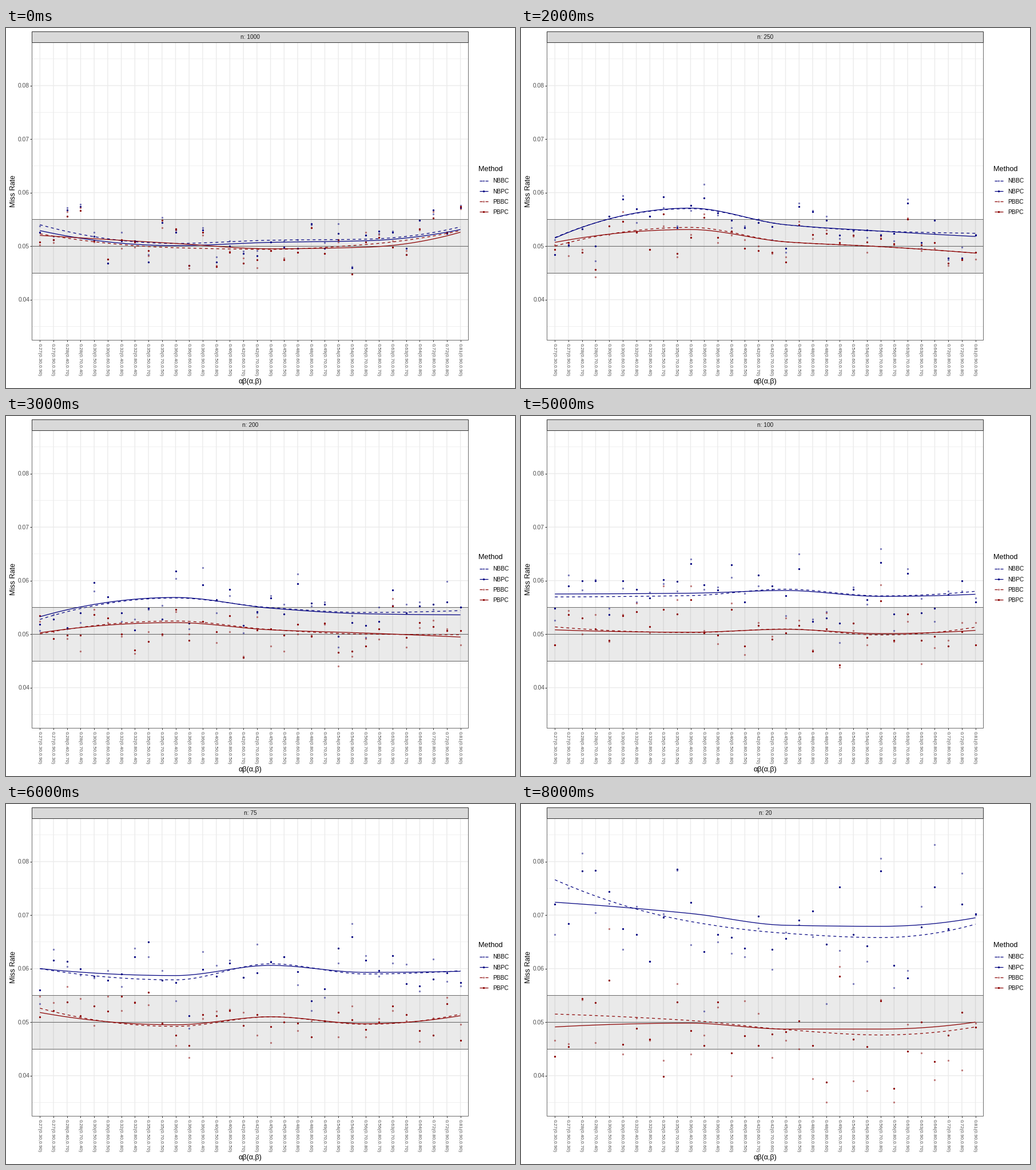
Animation, 890 px wide and 629 px high, one loop 9 s. Source, as a matplotlib script:

```python
import numpy as np
import matplotlib.pyplot as plt
from matplotlib.animation import FuncAnimation
from matplotlib.patches import Rectangle

W, H, DPI = 890, 629, 100
PX = 72 / DPI
LEFT, RIGHT, TOP, BOTTOM = 45, 808, 25, 545
NAVY, RED, DARK, GRID = "#000080", "#8b0000", "#333333", "#ebebeb"
METHODS = [("NBBC", NAVY, True), ("NBPC", NAVY, False),
           ("PBBC", RED, True), ("PBPC", RED, False)]
SIZES = [1000, 500, 250, 200, 150, 100, 75, 50, 20]

# Every (alpha, beta) pair in tenths whose product reaches 0.27
PAIRS = sorted(((a, b) for a in range(3, 10) for b in range(3, 10) if a * b >= 27),
               key=lambda p: (p[0] * p[1], p[0]))
COND = np.arange(len(PAIRS))
FINE = np.linspace(0, COND[-1], 125)

# Key points of the four curves, rates in units of 0.0001
KNOTS = np.array([0, 10, 17, 24, 31])
CURVES = {
    1000: ([540, 505, 511, 513, 536], [529, 501, 507, 510, 531],
           [523, 497, 494, 503, 529], [520, 505, 495, 498, 526]),
    250: ([516, 570, 540, 528, 524], [515, 571, 540, 528, 518],
          [500, 535, 508, 499, 487], [507, 531, 508, 499, 487]),
    150: ([539, 565, 559, 553, 564], [550, 566, 557, 548, 554],
          [501, 514, 509, 501, 511], [498, 512, 508, 505, 502]),
    75: ([600, 579, 609, 590, 596], [600, 587, 606, 593, 595],
         [526, 492, 510, 496, 515], [518, 495, 510, 497, 512]),
    50: ([624, 633, 620, 622, 663], [621, 626, 624, 633, 670],
         [514, 503, 510, 510, 509], [494, 496, 514, 515, 511]),
    20: ([766, 688, 666, 658, 683], [724, 703, 681, 679, 695],
         [515, 503, 486, 476, 491], [491, 498, 487, 487, 500]),
}


def knots_for(n):
    """Key points for sample size n; sizes between panels get the mean of both."""
    if n in CURVES:
        return np.array(CURVES[n], float)
    i = SIZES.index(n)
    return (knots_for(SIZES[i - 1]) + knots_for(SIZES[i + 1])) / 2


def smooth(vals, at):
    """Cubic Hermite curve that does not overshoot its key points."""
    h = np.diff(KNOTS)
    s = np.diff(vals) / h
    prod, total = s[:-1] * s[1:], s[:-1] + s[1:]
    turn = prod <= 0
    inner = np.where(turn, 0, 2 * prod / np.where(turn, 1, total))
    m = np.concatenate([[2 * s[0] - inner[0]], inner, [2 * s[-1] - inner[-1]]])
    i = np.clip(np.searchsorted(KNOTS, at, side="right") - 1, 0, len(h) - 1)
    t = (at - KNOTS[i]) / h[i]
    return ((1 + 2 * t) * (1 - t) ** 2 * vals[i] + t * (1 - t) ** 2 * h[i] * m[i]
            + t * t * (3 - 2 * t) * vals[i + 1] + t * t * (t - 1) * h[i] * m[i + 1])


def scatter(n):
    """Dots around the curves: a shared deviation plus noise that grows as n falls."""
    rng = np.random.default_rng(n)

    def noise(sd):
        return sd * np.clip(rng.normal(size=len(COND)), -2, 2)

    shared = noise(28)
    devs = []
    for _ in "NP":
        pc = shared + noise(160 / np.sqrt(n))
        devs += [pc + noise(220 / np.sqrt(n)), pc]
    rates = [smooth(k, COND) + d for k, d in zip(knots_for(n), devs)]
    return np.clip(2 * np.round(np.array(rates) / 2), 450 - 2000 / n, 860)


def xpx(cond):
    return 59.3 + 23.72 * cond


def ypx(rate):
    return 381.1 - (rate - 500) * 0.935


fig = plt.figure(figsize=(W / DPI, H / DPI), dpi=DPI, facecolor="white")
ax = fig.add_axes([0, 0, 1, 1])
ax.set(xlim=(0, W), ylim=(H, 0))
ax.axis("off")


def line(x, y, color=DARK, width=1.1, z=1, **kw):
    return ax.plot(x, y, color=color, lw=width * PX, zorder=z,
                   solid_capstyle="butt", **kw)[0]


def text(x, y, s, size, color="black", ha="center", rot=0):
    shift, a = 0.36 * size, np.radians(rot)
    return ax.text(x + shift * np.sin(a), y + shift * np.cos(a), s, color=color,
                   fontsize=size * PX, family="Liberation Sans", ha=ha, va="baseline",
                   rotation=rot, rotation_mode="anchor", zorder=8)


def box(x0, y0, x1, y1, fc, ec="none", z=2, alpha=None):
    ax.add_patch(Rectangle((x0, y0), x1 - x0, y1 - y0, fc=fc, ec=ec, lw=PX,
                           zorder=z, alpha=alpha))


def series(color, dashed, x=(), y=()):
    style = {"dashes": (4, 4)} if dashed else {}
    return line(x, y, color, 1.25, 5, **style)


def dots(color, faded, x=(), y=()):
    return ax.plot(x, y, "o", color=color, ms=3.3 * PX, mew=0,
                   alpha=0.5 if faded else 1, zorder=4)[0]


# Grid and axes
for rate in range(350, 851, 50):
    y, major = ypx(rate), rate % 100 == 0
    line((LEFT, RIGHT), (y, y), GRID, 1.4 if major else 0.7, snap=False)
    if major:
        line((42, LEFT), (y, y))
        text(41, y, f"{rate / 1e4:.2f}", 10.2, "#4d4d4d", "right")
for x, (a, b) in zip(xpx(COND), PAIRS):
    line((x, x), (TOP, BOTTOM), GRID, 1.4, snap=False)
    line((x, x), (BOTTOM, 548))
    text(x, 550.7, f"{a * b / 100:.2f}({a / 10:.2f},{b / 10:.2f})", 8.4, "#4d4d4d",
         "left", 270)

# Tolerance band, frame and strip
box(LEFT, ypx(550), RIGHT, ypx(450), DARK, alpha=0.1)
for rate in (450, 500, 550):
    line((LEFT, RIGHT), [ypx(rate)] * 2, "#6a6a6a", 1, 3)
box(LEFT, TOP, RIGHT, BOTTOM, "none", "#6b6b6b", 6)
box(LEFT, 6, RIGHT, TOP, "#d9d9d9", DARK, 7)
title = text(427, 15.4, "", 10.1, "#1a1a1a")
text(11, 285, "Miss Rate", 12.6, rot=90)
text(426.8, 616.2, "αβ(α,β)", 12.6)

# Legend
text(826, 245.3, "Method", 12.7, ha="left")
for k, (name, color, bc) in enumerate(METHODS):
    y = 266.7 + 18.2 * k
    series(color, bc, (828, 842.5), (y, y))
    dots(color, bc, [835.2], [y])
    text(850.7, y, name, 10.1, ha="left")

marks = [dots(color, bc) for _, color, bc in METHODS]
fits = [series(color, bc) for _, color, bc in METHODS]


def update(i):
    n = SIZES[i]
    title.set_text(f"n: {n}")
    for mark, fit, rates, knots in zip(marks, fits, scatter(n), knots_for(n)):
        mark.set_data(xpx(COND), ypx(rates))
        fit.set_data(xpx(FINE), ypx(smooth(knots, FINE)))
    return [title, *marks, *fits]


anim = FuncAnimation(fig, update, frames=len(SIZES), interval=1000,
                     repeat=True, repeat_delay=0, blit=False)
plt.show()
```
